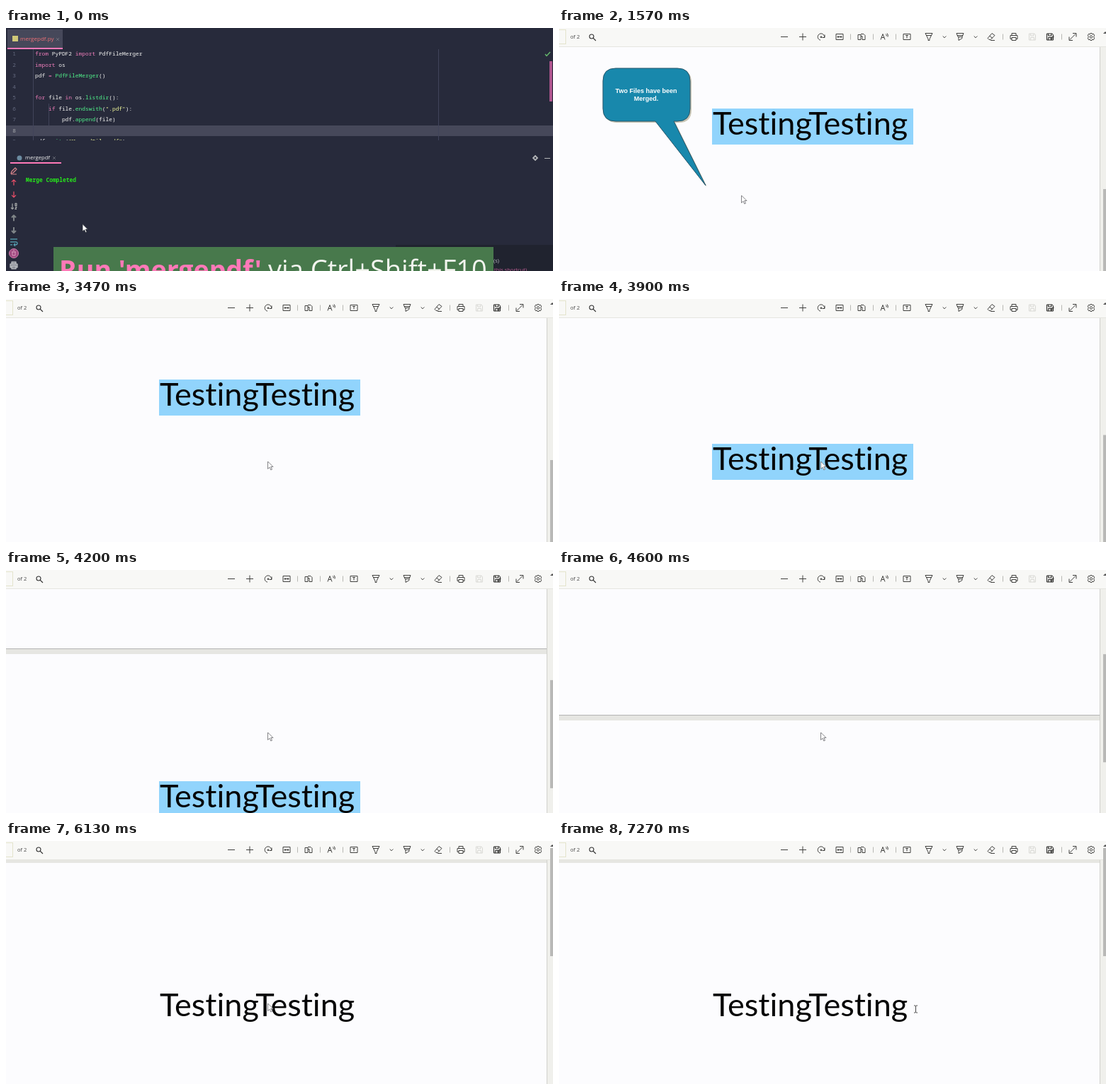
Recreate the animation shown at these times as an HTML page with a canvas. Size 772x344 px, loop 7430 ms.

```html
<!DOCTYPE html>
<html lang="en">
<head>
<meta charset="utf-8">
<title>Merging PDF files</title>
<style>
  html, body { margin: 0; width: 100%; height: 100%; overflow: hidden; }
  canvas { display: block; font-variant-ligatures: none; }
</style>
</head>
<body>
<canvas id="stage" width="772" height="344"></canvas>
<script>
const ctx = document.getElementById('stage').getContext('2d');
const LOOP = 7430, CUT = 1570, CALLOUT_END = 3330;
const MONO = '"Noto Sans Mono", monospace';
const SANS = '"Open Sans", sans-serif';
const DARK = '#272a3b', PANEL = '#46485a', PINK = '#ff79b8';

const clamp = p => Math.max(0, Math.min(1, p));
const easeOut = p => 1 - (1 - p) ** 2;
const easeInOut = p => p * p * (3 - 2 * p);
const progress = (t, start, length) => clamp((t - start) / length);

function rect(x, y, w, h, color) {
  ctx.fillStyle = color;
  ctx.fillRect(x, y, w, h);
}

function text(str, x, y, font, color, align = 'left') {
  ctx.font = font;
  ctx.fillStyle = color;
  ctx.textAlign = align;
  ctx.fillText(str, x, y);
}

function icon(d, x, y, stroke, fill, width = 1) {
  const path = new Path2D(d);
  ctx.save();
  ctx.translate(x, y);
  ctx.lineWidth = width;
  ctx.lineJoin = 'round';
  if (fill) { ctx.fillStyle = fill; ctx.fill(path); }
  if (stroke) { ctx.strokeStyle = stroke; ctx.stroke(path); }
  ctx.restore();
}

const circle = r => `M${r} 0A${r} ${r} 0 1 1 ${-r} 0A${r} ${r} 0 1 1 ${r} 0Z`;
const ARROW = 'M0 0V10.5L2.6 8.2L4.3 12L6 11.2L4.3 7.5H7.5Z';
const IBEAM = 'M-2.5 -5H-.8L0 -4.5L.8 -5H2.5M0 -4.5V4.5M-2.5 5H-.8L0 4.5L.8 5H2.5';
const CROSS = 'M-2 -2L2 2M2 -2L-2 2';
const UP = 'M0 4V-4M-3 -1L0 -4L3 -1';
const DOWN = 'M0 -4V4M-3 1L0 4L3 1';
const GEAR = circle(1.7) + 'M-1 -5H1L1.6 -3.6L3.4 -4.2L4.6 -2.2L3.7 0L4.6 2.2L3.4 4.2L1.6 3.6L1 5H-1L-1.6 3.6L-3.4 4.2L-4.6 2.2L-3.7 0L-4.6 -2.2L-3.4 -4.2L-1.6 -3.6Z';
const COG = circle(2.2) + 'M0 -4V-2M0 2V4M-4 0H-2M2 0H4';
const PRINTER = 'M-3 -2V-5H3V-2M-3 3H-5V-2H5V3H3M-3 1H3V5H-3Z';
const SAVE = 'M-4.5 -4.5H3L4.5 -3V4.5H-4.5ZM-2.5 -4.5V-1.5H2V-4.5M-2.5 4.5V1H2.5V4.5';
const CHEVRON = 'M-2.3 -1L0 1.3L2.3 -1';
const SEPARATOR = 'M.5 -4V4';

// Code colours: k keyword, f function, s string, w plain
const INK = { k: '#f27fbd', f: '#50f08a', s: '#eef59a', w: '#f4f4f2' };
const CODE = [
  'k:from |w:PyPDF2 |k:import |w:PdfFileMerger',
  'k:import |w:os',
  'w:pdf |k:= |f:PdfFileMerger|w:()',
  '',
  'k:for |w:file |k:in |w:os.|f:listdir|w:():',
  'w:    |k:if |w:file.|f:endswith|w:(|s:".pdf"|w:):',
  'w:        pdf.|f:append|w:(file)',
  '',
  'w:pdf.|f:write|w:(|s:"MergedFile.pdf"|w:)'
];
const IDE_TOOLS = [
  ['M-3 1L2 -4L4 -2L-1 3L-4 4ZM-4 5H4', '#d9858c'],
  [UP, '#f0506a'], [DOWN, '#f0506a'],
  ['M-2 -4V4M-4 2L-2 4L0 2M2 -4H4V-1H2ZM2 1H4L2 4H4', '#a5a8a8'],
  [UP, '#7f8588', 2], [DOWN, '#7f8588', 2],
  ['M-5 -4H5M-5 0H3Q5 0 5 2T3 4H0M2 2L0 4L2 6M-5 4H-2', '#58a5b8']
];
const PDF_TOOLS = [
  [318, 'M-5 0H5'], [344, 'M-5 0H5M0 -5V5'],
  [370, 'M-1 4.7A4.7 4.7 0 1 1 4.5 1M5 -3V1H1.5M-.8 -.5H.8V1H-.8Z'],
  [396, 'M-5 -4H5V4H-5ZM-3 0H3M-1.5 -1.5L-3 0L-1.5 1.5M1.5 -1.5L3 0L1.5 1.5'],
  [411, SEPARATOR], [427, 'M-5 -3H-1V4H-5ZM-1 -4H3L5 -2V4H1V-1H-1'],
  [443, SEPARATOR], [459, 'M-5 4L-2 -4L1 4M-4 1H0M2 -4Q4 -3 3 -1M4 -5Q6 -3 5 0'],
  [475, SEPARATOR], [491, 'M-5 -4H5V4H-5ZM-2 -2H2M0 -2V2'],
  [522, 'M-5 -5H5L1 3V5H-1V3ZM-4 -2H4'], [544, CHEVRON],
  [566, 'M-5 -5H5L3 0V2L-2 5V0H-3ZM-4 -2H4M-3 0H3'], [588, CHEVRON],
  [610, 'M-5 2L1 -5L5 -2L-1 4H-3ZM-2 -1L2 2M-1 5H5'],
  [626, SEPARATOR], [642, PRINTER], [668, SAVE, '#d8d8d4'],
  [693, SAVE + 'M0 3L4 -1L5 0L1 4Z', '#20201e'],
  [709, SEPARATOR], [725, 'M-4 4L4 -4M0 -5H5V0M-5 0V5H0'], [751, GEAR]
];

function drawCode() {
  ctx.save();
  ctx.beginPath();
  ctx.rect(0, 30, 772, 129);
  ctx.clip();
  rect(0, 138, 772, 15, PANEL);
  for (const [x, y, h] of [[610, 30, 129], [38, 30, 129], [60, 107, 31]]) rect(x, y, 1, h, '#41445a');
  const font = '500 7.9px ' + MONO;
  CODE.forEach((line, row) => {
    const y = 37 + row * 15.5;
    text(row + 1, 14, y, font, row === 7 ? '#a9abb0' : '#666b80', 'right');
    let x = 41;
    for (const part of line ? line.split('|') : []) {
      const str = part.slice(2);
      text(str, x, y, font, INK[part[0]]);
      x += ctx.measureText(str).width;
    }
  });
  ctx.restore();
}

function drawIde() {
  rect(0, 0, 772, 344, DARK);
  rect(2, 2, 78, 27, PANEL);
  rect(2, 28, 78, 2, PINK);
  rect(9, 11, 8, 8, '#cfc878');
  text('mergepdf.py', 20, 16, '8px ' + SANS, '#ee7076');
  icon(CROSS, 73, 16, '#7d8088', null, .7);
  drawCode();
  icon('M-3 0L-1 2.5L4 -3', 764, 37, '#65b96d', null, 1.4);
  rect(767, 47, 4, 57, '#b0568f');

  icon(circle(3.5), 19, 184, null, '#6b8ba0');
  text('mergepdf', 27, 184, '7.7px ' + SANS, '#f0f0f0');
  icon(CROSS, 68, 184, '#7d8088', null, .7);
  rect(6, 190, 72, 2, PINK);
  icon(COG, 747, 184, '#b4b6b8', null, 1.7);
  rect(760, 184, 8, 1, '#b4b6b8');
  IDE_TOOLS.forEach(([d, color, width], i) => icon(d, 11, 202 + i * 16.8, color, null, width || 1.2));
  icon(circle(6.5), 11, 319, '#d080ae', '#a04a80');
  icon('M-3 -2H3M-2 -2V3H2V-2M-1 -4H1', 11, 319, '#d99cbd');
  icon(PRINTER, 11, 336, '#c4c6ca', '#8c8f98', 1.2);
  text('Merge Completed', 28, 216, 'bold 7.9px ' + MONO, '#27e51c');

  rect(550, 307, 222, 37, '#20232f');
  text('(s)', 688, 330, '7.5px ' + SANS, '#b8babf');
  text('this shortcut)', 689, 343, '7.5px ' + SANS, '#b85a90');
  rect(67, 310, 621, 34, '#48794c');
  ctx.textBaseline = 'alphabetic';
  text("Run 'mergepdf'", 75, 355.5, 'bold 37.5px ' + SANS, PINK);
  text('via Ctrl+Shift+F10', 370, 355.5, '38px ' + SANS, '#f2f4ee');
  ctx.textBaseline = 'middle';
  icon(ARROW, 108, 277.5, '#22242c', '#fff', .7);
}

// Wheel notches: start time and resulting scroll position
const NOTCHES = [[3550, 468], [4000, 374], [4280, 280], [4850, 186], [5443, 93], [5760, 0]];

function scrollAt(t) {
  let pos = 559;
  for (const [start, end] of NOTCHES) pos += (end - pos) * easeOut(progress(t, start, 170));
  return pos;
}

function drawPage(top, selected) {
  rect(0, top, 764, 454, '#fcfcfe');
  rect(0, top + 454, 764, 1, '#b4b4b4');
  if (selected) rect(216, top + 180, 284, 51, '#91d4fc');
  ctx.textBaseline = 'alphabetic';
  ctx.letterSpacing = '0.01px'; // keeps "ti" from joining
  text('TestingTesting', 217, top + 217, '45px Lato, sans-serif', '#050505');
  ctx.letterSpacing = '0px';
  ctx.textBaseline = 'middle';
}

function drawToolbar() {
  rect(0, 0, 772, 26, '#f8f8f6');
  rect(0, 26, 772, 1, '#e6e6e0');
  ctx.lineWidth = 1;
  ctx.strokeStyle = '#e4e4cc';
  ctx.strokeRect(-4.5, 2.5, 14, 20);
  text('of 2', 16, 13, '7.5px ' + SANS, '#444');
  icon('M2 -1A3 3 0 1 1 -4 -1A3 3 0 1 1 2 -1ZM1 1L5 5', 47, 13, '#333', null, 1.1);
  for (const [x, d, color] of PDF_TOOLS) {
    icon(d, x, 12.5, color || (d === SEPARATOR ? '#b8b8b4' : '#40403e'));
  }
}

function drawCallout() {
  const shape = 'M80 57H167Q185 57 185 75V114Q185 132 167 132H162L207 223L136 132H80Q62 132 62 114V75Q62 57 80 57Z';
  icon(shape, 2, 2, null, '#c8c5b4');
  icon(shape, 0, 0, '#28566a', '#1888ac');
  const font = 'bold 9px "Liberation Sans", sans-serif';
  text('Two Files have been', 123, 90, font, '#fff', 'center');
  text('Merged.', 123, 101, font, '#fff', 'center');
}

function drawPointer(t) {
  if (t < 6570) {
    const p = easeInOut(progress(t, 1750, 950));
    icon(ARROW, 257.5 + 112 * p, 237 - 7 * p, '#75757a', '#fff', .9);
    return;
  }
  const left = easeInOut(progress(t, 6570, 220));
  const right = easeInOut(progress(t, 6790, 480));
  icon(IBEAM, 371 - 38 * left + 170.5 * right, 235 + 3 * right, '#333', null, .9);
}

function drawPdf(t) {
  const scroll = scrollAt(t);
  rect(0, 0, 772, 344, '#e6e6e2');
  drawPage(31 - scroll, false);
  drawPage(493 - scroll, true);
  rect(763, 26, 1, 318, '#d0d0cc');
  rect(764, 26, 8, 318, '#f0f0ec');
  drawToolbar();
  rect(768, 10 + scroll * .39, 4, 153, '#b9b9b7');
  icon('M-3 2L0 -1L3 2Z', 771, 6, null, '#555');
  if (t < CALLOUT_END) drawCallout();
  drawPointer(t);
}

function frame(now) {
  const t = now % LOOP;
  ctx.textBaseline = 'middle';
  if (t < CUT) drawIde(); else drawPdf(t);
  requestAnimationFrame(frame);
}
requestAnimationFrame(frame);
</script>
</body>
</html>
```
